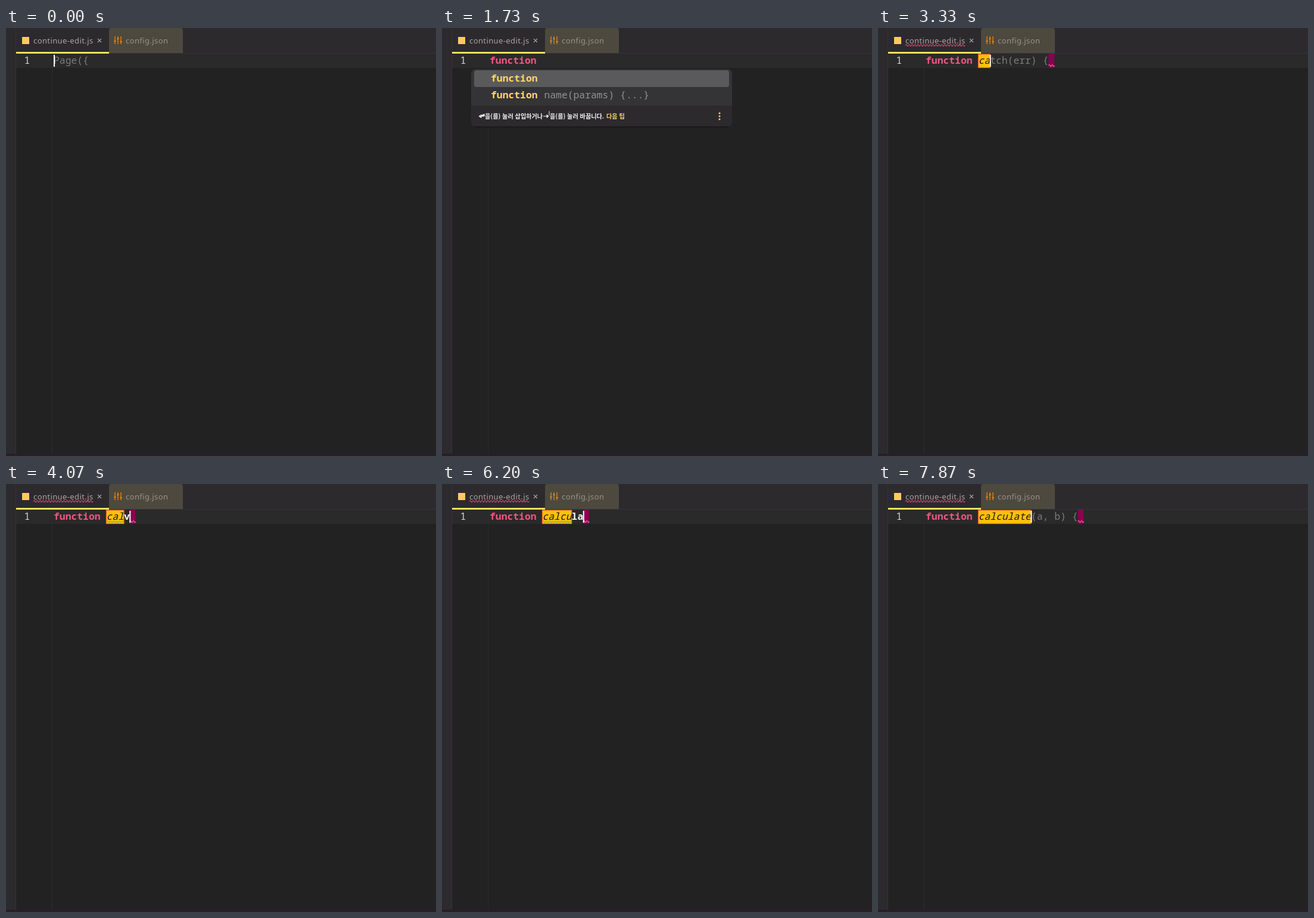
An HTML page for the animation above (8 s loop, 722x718 px).

```html
<!DOCTYPE html>
<html lang="ko">
<head>
<meta charset="utf-8">
<title>Inline completion in a code editor</title>
<style>
html, body { margin: 0; width: 100%; height: 100%; overflow: hidden; background: #222; }
svg { display: block; }
text { white-space: pre; }
.code { font: 500 16.38px "Noto Sans Mono", "DejaVu Sans Mono", monospace; }
.bold { font-weight: 600; }
.slant { font-style: italic; }
.tab { font: 500 13px "Noto Sans", "Open Sans", sans-serif; letter-spacing: .4px; }
.tip { font: 700 10.15px "Noto Sans CJK KR", "Noto Sans CJK", sans-serif; }
</style>
</head>
<body>
<svg width="722" height="718" viewBox="0 0 722 718">
  <rect width="722" height="718" fill="#222222"/>
  <rect y="43" x="17" width="705" height="24" fill="#2a2a2a"/>
  <rect width="722" height="43" fill="#2d2a2e"/>
  <rect y="42" x="173" width="549" height="1" fill="#343235"/>
  <rect width="16" height="718" fill="#2d2a2e"/>
  <rect x="16" width="1" height="718" fill="#353336"/>
  <rect x="77" y="43" width="1" height="671" fill="#2d2c2d"/>
  <rect y="714" width="722" height="4" fill="#2b1e25"/>
  <path d="M173 42V4q0-4 4-4h116q4 0 4 4v38z" fill="#4d493f"/>
  <rect x="17" y="40" width="156" height="3" fill="#ffe05f"/>
  <rect x="27" y="15" width="12" height="12" fill="#ffca5a"/>
  <text class="tab" x="46" y="26" fill="#aaa69f">continue-edit.js</text>
  <path d="M154 18l6 6m0-6l-6 6" stroke="#aaa69f" stroke-width="1.1"/>
  <path d="M183 14v13m5-13v13m5-13v13M181 22h4m1-4h4m1 5h4" stroke="#d9861c" stroke-width="1.4" fill="none"/>
  <text class="tab" x="201" y="26" fill="#97928a">config.json</text>
  <text class="code" x="30.5" y="60" fill="#d4d4d4">1</text>
  <g id="live"></g>
</svg>
<script>
const LOOP = 8000, LEFT = 80, CELL = 9.83, BASE = 60;
const live = document.getElementById('live');
const col = n => LEFT + n * CELL;

const rect = (x, y, w, h, fill, more = '') =>
  `<rect x="${x}" y="${y}" width="${w}" height="${h}" fill="${fill}" ${more}/>`;
const code = (x, y, s, fill, cls = '') =>
  s ? `<text class="code ${cls}" x="${x}" y="${y}" fill="${fill}">${s}</text>` : '';
const wave = (x, end, y, stroke) =>
  `<path d="M${x} ${y}q1.25-3 2.5 0${'t2.5 0'.repeat(Math.max(1, Math.round((end - x) / 2.5) - 1))}" ` +
  `fill="none" stroke="${stroke}" stroke-width="1.1"/>`;
const errorCell = x => rect(x, 43, 9.5, 24, '#8b0052') + wave(x, x + 9, 63, '#ff6d9d');

// rows: [matched, rest, greyed]
const menu = (x, indent, rows) => {
  const foot = 74 + 28 * rows.length;
  const h = foot + 35 - 69;
  const tip = (dx, s, fill = '#f4f4f4') =>
    `<text class="tip" x="${x + dx}" y="${foot + 21.5}" fill="${fill}">${s}</text>`;
  const line = ([hit, rest, note], i) => {
    const y = 90 + i * 28, at = n => x + indent + n * CELL;
    return code(at(0), y, hit, '#ffd866', 'bold') +
      code(at(hit.length), y, rest, '#f4f4f4', 'bold') +
      code(at(hit.length + rest.length + 1) + 1, y, note, '#929292');
  };
  const keys = `M${x + 22} ${foot + 14}v4h-9m4-2.5l-4 2.5 4 2.5z` +
    `M${x + 121} ${foot + 18}h9m-3-2.5l3 2.5-3 2.5zm4-6v7`;
  return rect(x + 2, 71, 434, h, '#1a1a1a', 'rx="7"') +
    rect(x, 69, 438, h, '#343436', 'rx="7"') +
    `<path d="M${x} ${foot}h438v28q0 7-7 7h-424q-7 0-7-7z" fill="#2d2a2e"/>` +
    rect(x + 5, 71, 428, 28, '#5a5a5c', 'rx="4"') +
    rows.map(line).join('') +
    `<path d="${keys}" fill="#f4f4f4" fill-rule="evenodd" stroke="#f4f4f4" stroke-width="1"/>` +
    tip(23, '을(를) 눌러 삽입하거나') + tip(132, '을(를) 눌러 바꿉니다.') +
    tip(227, '다음 팁', '#ffd866') +
    [13, 18, 23].map(d => `<circle cx="${x + 417}" cy="${foot + d}" r="1.5" fill="#ffd866"/>`).join('');
};

const keywordMenu = n => menu(49, 33, [
  ['function'.slice(0, n), 'function'.slice(n), ''],
  ['function'.slice(0, n), 'function'.slice(n), 'name(params) {...}']
]);
const nameMenu = () => menu(158.5, 11.5, [['c', 'ontinueEdit', '']]);

const KEYWORD = {
  plain: ['#f4f4f4', 'bold'],
  pink: ['#f0567f', 'bold'],
  cyan: ['#67d8e6', 'slant']
};

// word: leading text, mark: highlighted name, tail: fresh letters, ghost: suggestion
function draw({ word = 'function', look = 'pink', mark = '', tail = '', ghost = '',
                caret = true, broken = false, typo = false, popup }) {
  const start = word === 'function' && (mark || tail || broken) ? 9 : word.length;
  const tailAt = start + mark.length;
  const caretAt = tailAt + tail.length;
  const end = caretAt + ghost.length;
  let out = '';
  if (broken) out += wave(46, 147, 29, '#d84c74') + errorCell(col(end));
  if (look === 'cyan') out += errorCell(col(8)) + wave(LEFT, col(8), 63, '#fc9867');
  if (mark) {
    const w = mark.length * CELL;
    out += rect(col(9), 44, w, 22.5, '#ffc107', 'stroke="#ff6a2b" stroke-width="1.2"');
    if (typo) out += wave(col(9) + 1, col(tailAt) - 1, 63.5, '#7fae55');
  }
  out += code(LEFT, BASE, word, ...KEYWORD[look]);
  out += code(col(9), BASE, mark, '#1c1a14', 'slant');
  out += code(col(tailAt), BASE, tail, '#f6f6f6', 'bold');
  out += code(col(caretAt), BASE, ghost, '#7d7b7c');
  if (caret) out += rect(col(caretAt) - (caretAt ? .5 : 0), 45, 2, 20, '#ffffff');
  return out + (popup ? popup() : '');
}

const steps = [];
const at = (t, state) => steps.push([t, state]);
const named = (t, mark, tail = '', ghost = '', more = {}) =>
  at(t, { mark, tail, ghost, broken: true, ...more });

at(0, { word: '', ghost: 'Page({' });
at(330, { word: '', ghost: 'Page({', caret: false });
for (let n = 1; n <= 8; n++) {
  at(670 + (n - 1) * 110, {
    word: 'function'.slice(0, n), look: 'plain',
    popup: n > 1 ? () => keywordMenu(n) : null
  });
}
at(1530, { popup: () => keywordMenu(8) });
at(1730, { caret: false, popup: () => keywordMenu(8) });
at(2070, { word: 'function ' });
at(2400, { tail: 'c' });
at(2470, { tail: 'c', look: 'cyan', broken: true, caret: false, popup: nameMenu });
named(2870, '', 'ca');
named(3070, 'ca');
named(3330, 'ca', '', 'tch(err) {');
named(3400, 'ca', 'l');
named(3600, 'cal', '', '', { typo: true });
named(3730, 'cal', '', 'culate(a, b) {', { typo: true });
named(3930, 'cal', 'v', '', { typo: true });
named(4130, 'cal', 'v', 'erify() {', { typo: true });
named(4470, 'calv', '', 'erify() {', { typo: true });
named(4800, 'cal', '', '', { typo: true });
named(5130, 'cal', 'c', '', { typo: true });
named(5330, 'calc', 'u', '', { typo: true });
named(5470, 'calcu', '', '', { typo: true });
named(5600, 'calcu', '', 'late(a, b) {', { typo: true });
named(5930, 'calcu', 'l', '', { typo: true });
named(6130, 'calcu', 'la', '', { typo: true });
named(6470, 'calcula', '', '', { typo: true });
named(6670, 'calcula', '', 'te(a, b) {', { typo: true });
named(7000, 'calcula', 't', '', { typo: true });
named(7130, 'calcula', 't', 'e(a, b) {', { typo: true });
named(7270, 'calcula', 'te', '', { typo: true });
named(7400, 'calcula', 'te', '(a, b) {', { typo: true });
named(7730, 'calculate', '', '(a, b) {');

let shown = -1;
const begin = performance.now();
function tick() {
  const t = (performance.now() - begin) % LOOP;
  const next = steps.findLastIndex(([ms]) => ms <= t + .5);
  if (next !== shown) {
    shown = next;
    live.innerHTML = draw(steps[next][1]);
  }
  requestAnimationFrame(tick);
}
tick();
</script>
</body>
</html>
```
